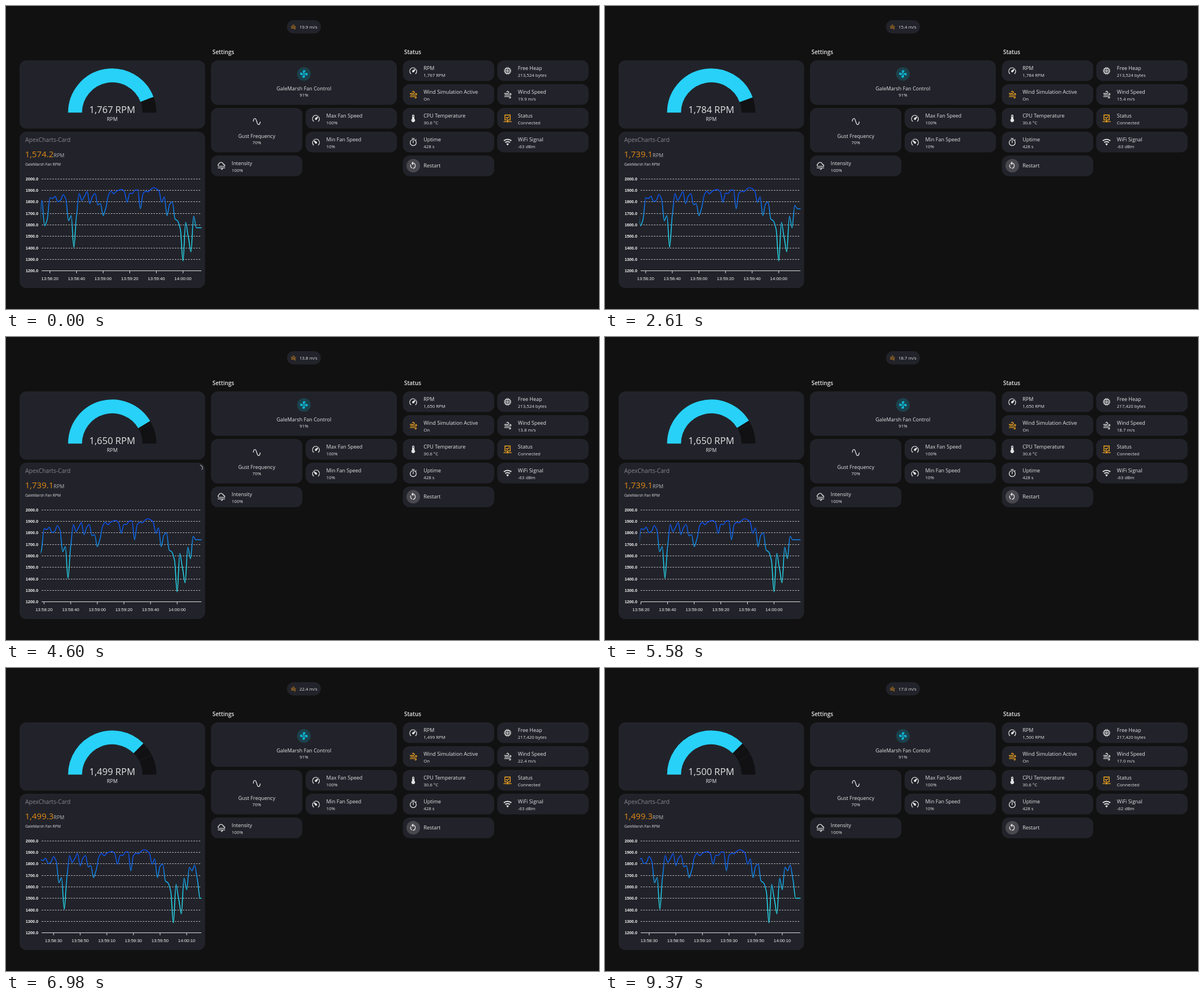
These frames come from a looping animation (1047 by 535 pixels, 9.5 s). An HTML page:

```html
<!DOCTYPE html>
<html lang="en">
<head>
<meta charset="utf-8">
<title>Fan dashboard</title>
<style>
html, body { margin: 0; width: 100%; height: 100%; overflow: hidden; background: #111; }
svg { display: block; width: 1047px; height: 535px; font-family: "Open Sans", "Noto Sans", sans-serif; }
.main { font-size: 9px; font-weight: 500; fill: #e4e4e6; }
.sub { font-size: 7.9px; font-weight: 500; fill: #e4e4e6; }
.head { font-size: 9.9px; font-weight: 600; fill: #e6e6e6; }
.axis { font: 7.8px "Liberation Sans", Arial, sans-serif; fill: #f2f2f2; }
.axis.y { font-size: 7.3px; font-weight: 700; }
.mid { text-anchor: middle; }
.end { text-anchor: end; }
</style>
</head>
<body>
<svg id="stage" viewBox="0 0 1047 535">
  <defs>
    <linearGradient id="heat" gradientUnits="userSpaceOnUse" x1="0" y1="318" x2="0" y2="450">
      <stop offset="0" stop-color="#0b45f2"/>
      <stop offset=".2" stop-color="#0a62f4"/>
      <stop offset=".4" stop-color="#129ff2"/>
      <stop offset=".55" stop-color="#1cc9f2"/>
      <stop offset=".7" stop-color="#24dff2"/>
      <stop offset="1" stop-color="#2ae6f5"/>
    </linearGradient>
    <clipPath id="plot"><rect x="61.5" y="296" width="284" height="176"/></clipPath>
  </defs>
</svg>
<script>
const LOOP = 9500;
const stage = document.getElementById('stage');
const CARD = '#22232a', LIGHT = '#e1e1e3', AMBER = '#f6a81f';

function add(tag, attrs, parent = stage) {
  const el = document.createElementNS('http://www.w3.org/2000/svg', tag);
  for (const key in attrs) el.setAttribute(key, attrs[key]);
  parent.appendChild(el);
  return el;
}

function text(x, y, str, cls, extra) {
  const el = add('text', { x, y, class: cls, ...extra });
  el.textContent = str;
  return el;
}

function card(x, y, w, h, r = 12) {
  add('rect', { x, y, width: w, height: h, rx: r, fill: CARD });
}

// Glyphs on a 24-unit square: "fill" shapes and "line" strokes.
const icons = {
  wind: { line: 'M4 9h8a3 3 0 1 0-2.1-5.1M5 13h14a2 2 0 1 0-1.4-3.4M4 17h14a2 2 0 1 1-1.4 3.4' },
  speed: { fill: 'M12 16A3 3 0 0 1 9 13C9 11.9 9.6 10.9 10.5 10.4L20.2 4.8 14.7 14.4C14.2 15.3 13.2 16 12 16Z',
    line: 'M5.6 19.4A9 9 0 0 1 16 4.9M20 9A9 9 0 0 1 18.4 19.4' },
  slow: { fill: 'M12 16A3 3 0 0 0 15 13C15 11.9 14.4 10.9 13.5 10.4L3.8 4.8 9.3 14.4C9.8 15.3 10.8 16 12 16Z',
    line: 'M18.4 19.4A9 9 0 0 0 8 4.9M4 9A9 9 0 0 0 5.6 19.4' },
  chip: { line: 'M6 6h12v12H6zM10 10h4v4h-4zM10 3v3M14 3v3M10 18v3M14 18v3M3 10h3M3 14h3M18 10h3M18 14h3' },
  heat: { fill: 'M15 13V5A3 3 0 0 0 9 5V13A5 5 0 1 0 15 13M12 4A1 1 0 0 1 13 5V8H11V5A1 1 0 0 1 12 4' },
  net: { line: 'M5 3h14v13H5zM8.5 9.3l2.6 2.6 4.6-4.6M12 16v3M2 20.5h8M14 20.5h8',
    fill: 'M12 18.5a2 2 0 1 1 0 4 2 2 0 0 1 0-4' },
  timer: { line: 'M12 5a8 8 0 1 1 0 16 8 8 0 0 1 0-16M9 2h6M12 8.5v5M18.4 6.6l1.4-1.4' },
  wifi: { line: 'M2 8Q12 .8 22 8M5.7 12.6Q12 8.3 18.3 12.6', fill: 'M12 21l3.6-4.8Q12 13.6 8.4 16.2Z', w: 3, cap: 'butt' },
  restart: { line: 'M11.5 5A7 7 0 0 1 11 18.9M9 18.4A7 7 0 0 1 5.9 8.7', fill: 'M12 .6V10.6L7 5.6Z', cap: 'butt' },
  sine: { line: 'M3 12C3 10 3.4 4 7.5 4 12 4 12 20 16.5 20 20.6 20 21 14 21 12', cap: 'butt' },
  cloud: { line: 'M5 13A3.9 3.9 0 0 1 5.5 6.2 6 6 0 0 1 17 7.5 3.6 3.6 0 0 1 20.5 13H7M3 17h10a2 2 0 1 1-1.5 3.4M16 17h5' },
  fan: { fill: 'M12 11A1 1 0 0 0 11 12 1 1 0 0 0 12 13 1 1 0 0 0 13 12 1 1 0 0 0 12 11' }
};
const blade = 'M12.5 2C17 2 17.1 5.6 14.75 6.75 13.2 7.5 13 9.2 13 11L10.1 9.65C8.1 6 9 2 12.5 2Z';

function icon(name, cx, cy, color = LIGHT, size = 16) {
  const { fill, line, w = 2, cap = 'round' } = icons[name];
  const s = size / 24;
  const g = add('g', { transform: `translate(${cx - size / 2} ${cy - size / 2}) scale(${s})` });
  if (line) add('path', { d: line, fill: 'none', stroke: color, 'stroke-width': w, 'stroke-linecap': cap }, g);
  if (fill) add('path', { d: fill, fill: color, 'fill-rule': 'evenodd' }, g);
  if (name === 'fan') {
    for (let i = 0; i < 4; i++) add('path', { d: blade, fill: color, transform: `rotate(${i * 90} 12 12)` }, g);
  }
}

function tile(x, y, name, title, value, color) {
  card(x, y, 161.3, 36.5);
  icon(name, x + 18.3, y + 18.5, color);
  text(x + 36.5, y + 16.8, title, 'main');
  return text(x + 36.5, y + 28.6, value, 'sub');
}

// Top badge and headings
card(496, 25, 60, 23.5, 11.75);
icon('wind', 507.3, 37, '#cf8520', 10.8);
const badge = text(518, 40, '', 'sub');
text(364.5, 85, 'Settings', 'head');
text(703, 85, 'Status', 'head');

// Settings
card(362, 96, 328, 78.5);
add('circle', { cx: 526, cy: 120, r: 12, fill: '#1b424d' });
icon('fan', 526, 120, '#10b5d3');
text(526, 148.8, 'GaleMarsh Fan Control', 'main mid');
text(526, 160.3, '91%', 'sub mid');
card(362, 180, 161.3, 78.5);
icon('sine', 442.7, 204);
text(442.7, 232.8, 'Gust Frequency', 'main mid');
text(442.7, 244.4, '70%', 'sub mid');
tile(529, 180, 'speed', 'Max Fan Speed', '100%');
tile(529, 222, 'slow', 'Min Fan Speed', '10%');
tile(362, 264, 'cloud', 'Intensity', '100%');

// Status
const rpmText = tile(700.7, 96, 'speed', 'RPM', '');
const heapText = tile(867.3, 96, 'chip', 'Free Heap', '');
tile(700.7, 138, 'wind', 'Wind Simulation Active', 'On', AMBER);
const windText = tile(867.3, 138, 'wind', 'Wind Speed', '');
tile(700.7, 180, 'heat', 'CPU Temperature', '30.6 °C');
tile(867.3, 180, 'net', 'Status', 'Connected', AMBER);
tile(700.7, 222, 'timer', 'Uptime', '428 s');
const wifiText = tile(867.3, 222, 'wifi', 'WiFi Signal', '');
card(700.7, 264, 161.3, 36.5);
add('circle', { cx: 719, cy: 282, r: 12, fill: '#48484e' });
icon('restart', 719, 282);
text(737.2, 285.2, 'Restart', 'main');

// Gauge
const GX = 187.6, GY = 188.3, GR = 65.7;
card(24, 96, 327.5, 120.5);
const polar = (deg, r) => {
  const a = deg * Math.PI / 180;
  return `${GX - r * Math.cos(a)} ${GY - r * Math.sin(a)}`;
};
const arc = deg => `M${polar(0, GR)}A${GR} ${GR} 0 0 1 ${polar(deg, GR)}`;
const ring = { fill: 'none', 'stroke-width': 24.6 };
add('path', { ...ring, d: arc(180), stroke: '#111113' });
const seams = [[153, 4500], [141, 6200]].map(([deg, from]) => ({
  from,
  el: add('path', { d: `M${polar(deg, 54)}L${polar(deg, 78)}`, stroke: '#1d1d21', 'stroke-width': 1 })
}));
const fillArc = add('path', { ...ring, stroke: '#28d1f8' });
const gaugeText = text(GX, 189, '', 'mid', { 'font-size': 16.5, fill: '#e4e4e6' });
text(GX, 203, 'RPM', 'main mid');

// Chart
card(24, 222, 327.5, 276);
text(34, 239.5, 'ApexCharts-Card', '', { 'font-size': 10.2, 'font-weight': 500, fill: '#85868b' });
const big = add('text', { x: 33.5, y: 266.7 });
const bigValue = add('tspan', { 'font-size': 15, 'font-weight': 500, fill: '#e08a16' }, big);
add('tspan', { 'font-size': 9, fill: '#b4b4b8' }, big).textContent = 'RPM';
text(34, 282, 'GaleMarsh Fan RPM', '', { 'font-size': 6.7, fill: '#dcdcde' });
for (let i = 0; i <= 8; i++) {
  const y = 305 + i * 20.35;
  text(57, y + 2.6, (2000 - i * 100).toFixed(1), 'axis y end');
  add('path', {
    d: `M63 ${Math.floor(y) + .5}H345`, stroke: i < 8 ? '#bcbcc0' : '#dededf',
    'stroke-dasharray': i < 8 ? '2.7 2' : 'none', 'stroke-width': 1
  });
}
const ticks = Array.from({ length: 6 }, () => ({
  mark: add('path', { stroke: '#dededf' }),
  label: text(0, 483.6, '', 'axis mid')
}));
const line = add('path', {
  fill: 'none', stroke: 'url(#heat)', 'stroke-width': 1.5, 'stroke-linejoin': 'round', 'clip-path': 'url(#plot)'
});
const spinner = add('path', {
  d: 'M341.1 226.1A5 5 0 0 1 346.5 233.1', fill: 'none', stroke: '#96969a', 'stroke-width': 1.3
});

// Heights of the samples, one every two seconds; index 54 is 14:00:00.
const samples = [
  395, 343, 388, 377, 338.5, 340, 336, 345.5, 343, 333, 341, 379, 370, 426, 370, 331, 343.5, 336, 327.5, 349,
  336, 331, 351, 349, 370, 357, 334, 327, 331.5, 327, 325, 324, 328, 346.5, 330.5, 331, 325, 324.5, 358, 331,
  327, 328, 323, 321, 322.5, 327, 346.5, 337, 370, 350, 346, 376, 379.5, 394, 450, 382, 408, 434, 371, 391.5,
  352, 358, 348, 373, 406.5
];
const PX = 2.35, ZERO = 54;

// Step tables: [time, value]
const rpm = [[0, 1767], [330, 1739], [2130, 1784], [3880, 1650], [5780, 1499], [7700, 1500]];
const wind = [[0, 19.9], [330, 21.1], [1360, 18.1], [1760, 16.8], [2130, 15.4], [3090, 14.6], [3880, 13.8],
  [4910, 16.2], [5080, 18.7], [5780, 21.1], [6950, 22.4], [7470, 23.9], [7700, 25], [8840, 21.3], [9240, 17]];
const origin = [[0, 312.5], [330, 310.3], [1490, 309], [1830, 307.7], [2130, 306.8], [3090, 304.6], [3880, 302.2],
  [5150, 299.5], [5580, 298.5], [5780, 297.8], [6950, 295.5], [7470, 294.6], [7700, 294], [8910, 291.2], [9240, 289.5]];
const latest = [[0, 1574.2, 5], [2130, 1739.1, 7], [6950, 1499.3, 10]];
const heap = [[0, '213,524'], [5450, '217,420']];
const wifi = [[0, -63], [9240, -62]];
const loading = [[3090, 3720], [4390, 4790], [7700, 8620]];

const index = (table, t) => table.findLastIndex(row => row[0] <= t);
const at = (table, t) => table[index(table, t)][1];

function bezier(x1, y1, x2, y2) {
  const f = (a, b, u) => 3 * a * u * (1 - u) ** 2 + 3 * b * u * u * (1 - u) + u ** 3;
  return x => {
    let lo = 0, hi = 1;
    for (let i = 0; i < 20; i++) {
      const m = (lo + hi) / 2;
      if (f(x1, x2, m) < x) lo = m; else hi = m;
    }
    return f(y1, y2, lo);
  };
}
const ease = bezier(.25, .1, .25, 1), spin = bezier(.5, 0, .5, 1);

// Monotone cubic through equally spaced points
function smooth(ys, x0, step) {
  const slope = ys.map((y, i) => {
    if (!i || i === ys.length - 1) return 0;
    const a = y - ys[i - 1], b = ys[i + 1] - y;
    return a * b <= 0 ? 0 : Math.sign(a) * Math.min(Math.abs(a), Math.abs(b), Math.abs(a + b) / 4) * 2 / 1.5;
  });
  let d = `M${x0} ${ys[0]}`;
  for (let i = 1; i < ys.length; i++) {
    const x = x0 + i * step;
    d += `C${x - step * 2 / 3} ${ys[i - 1] + slope[i - 1] / 3} ${x - step / 3} ${ys[i] - slope[i] / 3} ${x} ${ys[i]}`;
  }
  return d;
}

function clock(sec) {
  const s = 14 * 3600 + sec;
  return [s / 3600, s / 60 % 60, s % 60].map(v => String(Math.floor(v)).padStart(2, '0')).join(':');
}

function drawChart(t) {
  const x0 = at(origin, t);
  const [, value, last] = latest[index(latest, t)];
  bigValue.textContent = value.toLocaleString('en-US', { minimumFractionDigits: 1 });
  const ys = samples.slice(0, ZERO + last + 1);
  line.setAttribute('d', smooth(ys, x0 - ZERO * 2 * PX, 2 * PX) + 'H345.5');
  const first = Math.ceil((63 - x0) / PX / 10) * 10;
  ticks.forEach(({ mark, label }, i) => {
    const sec = first + i * 20, x = x0 + sec * PX;
    const show = x <= 345 ? 'visible' : 'hidden';
    mark.setAttribute('d', `M${x} 468V472`);
    mark.setAttribute('visibility', show);
    label.setAttribute('x', x);
    label.setAttribute('visibility', show);
    label.textContent = clock(sec);
  });
}

function draw(t) {
  const i = index(rpm, t), now = rpm[i][1], before = i ? rpm[i - 1][1] : now;
  const shown = before + (now - before) * ease(Math.min(1, (t - rpm[i][0]) / 1000));
  fillArc.setAttribute('d', arc(shown / 2000 * 180));
  const label = now.toLocaleString('en-US') + ' RPM';
  gaugeText.textContent = rpmText.textContent = label;
  badge.textContent = windText.textContent = at(wind, t).toFixed(1) + ' m/s';
  heapText.textContent = at(heap, t) + ' bytes';
  wifiText.textContent = at(wifi, t) + ' dBm';
  for (const s of seams) s.el.setAttribute('visibility', t >= s.from ? 'visible' : 'hidden');
  drawChart(t);
  const busy = loading.find(([a, b]) => t >= a && t < b);
  spinner.setAttribute('visibility', busy ? 'visible' : 'hidden');
  if (busy) spinner.setAttribute('transform', `rotate(${spin((t - busy[0]) % 1200 / 1200) * 360} 342 231)`);
}

function frame() {
  draw(performance.now() % LOOP);
  requestAnimationFrame(frame);
}
frame();
</script>
</body>
</html>
```
